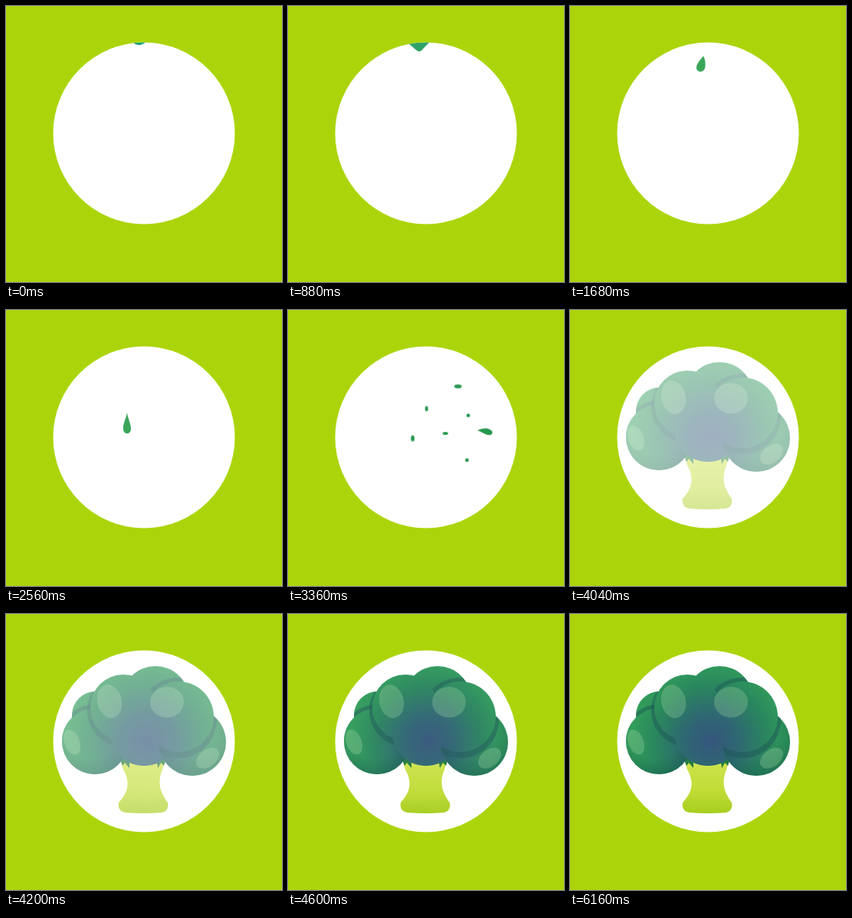
An HTML page without scripts for the animation above (6.44 s loop, 360 px wide and 360 px high).

```html
<!DOCTYPE html>
<html lang="en">
<head>
<meta charset="utf-8">
<title>Broccoli drop</title>
<style>
html, body { margin: 0; width: 100%; height: 100%; overflow: hidden; background: #abd50a; }
svg { display: block; width: 100vw; height: 100vh; }
.puddle, .drop, .bits *, .broccoli { animation: 6440ms linear infinite; }

.puddle { fill: #27a078; animation-name: puddle; }
@keyframes puddle {
  0%, 6.2% { d: path("M164 46C168 50 171 51 174 51C177 50 180 50 183 46Z"); fill: #1fa07c; }
  16.15%, 17.4% { d: path("M144 44C160 50 165 62 170 62C175 62 178 52 190 44Z"); fill: #35a562; }
  23% { d: path("M158 44C168 50 163 79 170 79C178 79 173 52 186 44Z"); fill: #3aa65a; }
  24.8%, 100% { d: path("M164 40C168 42 170 43 174 43C177 43 180 42 183 40Z"); fill: #3aa65a; }
}

.drop { fill: #3aa65a; visibility: hidden; animation-name: fall; }
@keyframes fall {
  0%, 22.9% { visibility: hidden; transform: translate(171px, 69px); }
  23% { visibility: visible; transform: translate(171px, 69px); }
  26.1% {
    transform: translate(171px, 76px);
    d: path("M3 -11C6 -5 6 1 5 5C3 11 -4 11 -6 6C-7 0 -1 -6 3 -11Z");
  }
  26.7%, 27.9% { transform: translate(170px, 79px); }
  32.3%, 34.7% { transform: translate(164px, 112px); }
  39.7%, 42.2% {
    transform: translate(158px, 148px);
    d: path("M0 -14C1 -6 5 0 5 7C5 15 -5 15 -5 7C-6 2 -2 -5 0 -14Z");
  }
  44.7% { transform: translate(168px, 170px) rotate(-35deg); }
  47.2% { visibility: visible; transform: translate(206px, 184px) rotate(-70deg); }
  47.21%, 100% { visibility: hidden; transform: translate(206px, 184px) rotate(-70deg); }
}

.bits { fill: #279750; }
.bits * {
  visibility: hidden;
  transform-box: fill-box;
  transform-origin: center;
  animation-name: splash;
}
@keyframes splash {
  0%, 47.19% { visibility: hidden; transform: scale(1.5); }
  47.2% { visibility: visible; transform: scale(1.5); animation-timing-function: ease-out; }
  51% { transform: translate(var(--x), var(--y)) scale(2); animation-timing-function: ease-in; }
  59.6% { visibility: visible; transform: none; }
  60.6% { visibility: visible; transform: scale(0); }
  60.7%, 100% { visibility: hidden; transform: scale(0); }
}

.broccoli { opacity: 0; animation-name: appear; }
@keyframes appear {
  0%, 56.5% { opacity: 0; }
  59.6% { opacity: .22; }
  65.2% { opacity: .66; }
  71.4% { opacity: .97; }
  73.9%, 100% { opacity: 1; }
}
.shade { fill: #1c5356; opacity: .45; }
.shine { fill: #b5e3b0; opacity: .26; }
</style>
</head>
<body>
<svg viewBox="0 0 360 360">
  <defs>
    <radialGradient id="crown" gradientUnits="userSpaceOnUse" cx="184" cy="166" r="112">
      <stop offset="0" stop-color="#35567c"/>
      <stop offset=".3" stop-color="#2f6673"/>
      <stop offset=".65" stop-color="#2a865e"/>
      <stop offset="1" stop-color="#33a359"/>
    </radialGradient>
    <linearGradient id="stalk" x1="0" y1="0" x2="0" y2="1">
      <stop offset="0" stop-color="#cfe450"/>
      <stop offset=".6" stop-color="#c0dc35"/>
      <stop offset="1" stop-color="#a6ce1e"/>
    </linearGradient>
    <radialGradient id="rim" cx=".45" cy=".38" r=".63">
      <stop offset=".6" stop-color="#14594a" stop-opacity="0"/>
      <stop offset="1" stop-color="#14594a" stop-opacity=".5"/>
    </radialGradient>
    <clipPath id="disc"><circle cx="180" cy="166" r="118.5"/></clipPath>
    <clipPath id="rightBall"><circle cx="243" cy="167" r="44"/></clipPath>
    <clipPath id="leftBalls">
      <circle cx="116" cy="166" r="43"/><circle cx="117" cy="132" r="31"/>
    </clipPath>
    <clipPath id="backBall"><circle cx="195" cy="112" r="44"/></clipPath>
  </defs>

  <rect width="360" height="360" fill="#abd50a"/>
  <circle cx="180" cy="166" r="118.5" fill="#fff"/>

  <g class="broccoli">
    <path fill="url(#stalk)" d="M149 189H208L204 203C196 222 203 235 211 246Q213 257 203 259Q180 261 156 259Q145 257 147 246C157 235 164 222 153 203Z"/>
    <path fill="#237a43" d="M148 188L152 198L155 194L161 201L161 194L170 188ZM190 188L197 194L198 201L202 194L206 198L209 188Z"/>
    <g fill="url(#crown)">
      <circle cx="195" cy="112" r="44"/>
      <circle class="shade" cx="225" cy="136" r="53" clip-path="url(#backBall)"/>
      <circle cx="117" cy="132" r="31"/>
      <circle class="shade" cx="116" cy="166" r="48" clip-path="url(#leftBalls)"/>
      <circle cx="180" cy="154" r="44"/>
      <circle cx="116" cy="166" r="43"/>
      <circle cx="116" cy="166" r="43" fill="url(#rim)"/>
      <circle class="shade" cx="153" cy="126" r="47" clip-path="url(#leftBalls)"/>
      <circle cx="180" cy="154" r="44"/>
      <circle cx="243" cy="167" r="44"/>
      <circle cx="243" cy="167" r="44" fill="url(#rim)"/>
      <circle class="shade" cx="225" cy="138" r="50" clip-path="url(#rightBall)"/>
      <circle cx="153" cy="122" r="43"/>
      <circle cx="225" cy="134" r="46"/>
    </g>
    <g class="shine">
      <ellipse cx="135" cy="114" rx="16" ry="22" transform="rotate(-12 135 114)"/>
      <ellipse cx="210" cy="115" rx="22" ry="20"/>
      <ellipse cx="86" cy="167" rx="10" ry="17" transform="rotate(-20 86 167)"/>
      <ellipse cx="263" cy="188" rx="17" ry="11" transform="rotate(-38 263 188)"/>
    </g>
  </g>

  <g clip-path="url(#disc)">
    <path class="puddle" d="M164 46C168 50 171 51 174 51C177 50 180 50 183 46Z"/>
    <path class="drop" d="M3 -11C6 -5 6 1 5 5C3 11 -4 11 -6 6C-7 0 -1 -6 3 -11Z"/>
  </g>

  <g class="bits">
    <path d="M215 179Q222 176 225 180Q225 183 221 182Z" style="--x:38px;--y:-22px"/>
    <ellipse cx="212" cy="175" rx="2.5" ry="1.3" style="--x:10px;--y:-78px"/>
    <ellipse cx="202" cy="177" rx="1" ry="1.8" style="--x:-22px;--y:-50px"/>
    <ellipse cx="197.500" cy="181" rx="1.2" ry="2" style="--x:-36px;--y:-14px"/>
    <circle cx="210" cy="184" r="1.2" style="--x:26px;--y:-48px"/>
    <ellipse cx="213" cy="190" rx="1.8" ry="1" style="--x:-8px;--y:-30px"/>
    <circle cx="216" cy="192" r="1.2" style="--x:18px;--y:4px"/>
  </g>
</svg>
</body>
</html>
```
